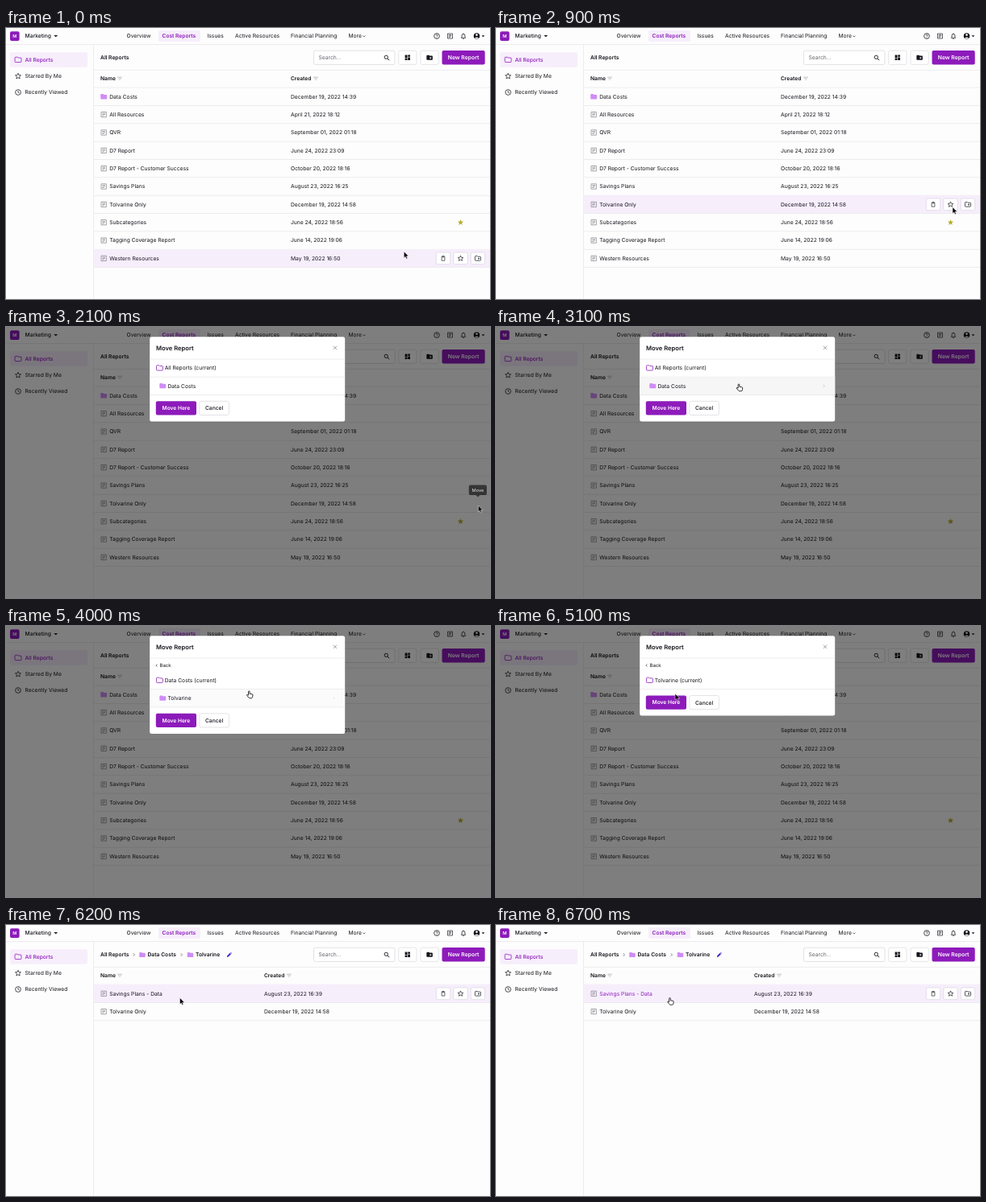
Write an HTML page that moves like this. It is 600x337 px and loops after 7.1 s.

```html
<!DOCTYPE html>
<html lang="en">
<head>
<meta charset="utf-8">
<title>Move a report into a folder</title>
<style>
html, body { margin: 0; width: 100%; height: 100%; overflow: hidden; background: #fdfdfd; }
svg { display: block; width: 100%; height: 100%; }
text { font-family: Inter, "Open Sans", sans-serif; text-rendering: geometricPrecision; white-space: pre; }
</style>
</head>
<body>
<svg id="stage" viewBox="0 0 600 337"></svg>
<script>
const LOOP = 7100, STEP = 100;
const PURPLE = '#8d1bbb', TINT = '#f7eefc', INK = '#15151c', LINE = '#e6e6e8', FOLDER = '#d08cf6';
const VENDOR = 'Tolvarine';
const stage = document.getElementById('stage');

const reports = [
  ['Data Costs', 'December 19, 2022 14:39'],
  ['All Resources', 'April 21, 2022 18:12'],
  ['QVR', 'September 01, 2022 01:18'],
  ['D7 Report', 'June 24, 2022 23:09'],
  ['D7 Report - Customer Success', 'October 20, 2022 18:16'],
  ['Savings Plans', 'August 23, 2022 16:25'],
  [VENDOR + ' Only', 'December 19, 2022 14:58'],
  ['Subcategories', 'June 24, 2022 18:56'],
  ['Tagging Coverage Report', 'June 14, 2022 19:06'],
  ['Western Resources', 'May 19, 2022 16:50']
];
const folderReports = [
  ['Savings Plans - Data', 'August 23, 2022 16:39'],
  [VENDOR + ' Only', 'December 19, 2022 14:58']
];
const STARRED = 7, ROW_TOP = 74.1, ROW_H = 22.35;

// Icons on a 24-unit grid
const FOLDER_PATH = 'M10 4H4c-1.1 0-2 .9-2 2v12c0 1.1.9 2 2 2h16c1.1 0 2-.9 2-2V8c0-1.1-.9-2-2-2h-8z';
const PLUS = 'M12 13h6M15 10v6';
const icons = {
  folder: FOLDER_PATH,
  star: 'M12 17.3L18.2 21l-1.7-7L22 9.2l-7.2-.6L12 2 9.2 8.6 2 9.2 7.5 14l-1.7 7z',
  clock: 'M21 12a9 9 0 1 1-18 0a9 9 0 1 1 18 0M12 6.5V12l4 2.5',
  search: 'M16 10a6 6 0 1 1-12 0a6 6 0 1 1 12 0M14.5 14.5L21 21',
  report: 'M3 3h18v18H3zM7 8h10M7 12h10M7 16h6',
  filter: 'M3 7h18M6 12h12M10 17h4',
  grid: 'M3 3h8v10H3zM13 3h8v6h-8zM13 11h8v10h-8zM3 15h8v6H3z',
  trash: 'M6 7h12v14H6zM4.500 4.500h15M9 3h6',
  folderPlus: FOLDER_PATH + PLUS,
  plus: PLUS,
  pen: 'M3 21v-4L14 6l4 4L7 21zM15.500 4.500L17 3l4 4-1.500 1.500z',
  help: 'M21 12a9 9 0 1 1-18 0a9 9 0 1 1 18 0M9 10a3 3 0 1 1 4.500 2.600q-1.500 1-1.500 2M12 16.500v2',
  bell: 'M5 18h14l-2-3v-5a5 5 0 0 0-10 0v5zM12 5V3M10 21h4',
  user: 'M22 12a10 10 0 1 1-20 0a10 10 0 1 1 20 0',
  right: 'M9 5l7 7-7 7',
  left: 'M15 5l-7 7 7 7',
  down: 'M5 9l7 7 7-7',
  caret: 'M3 8h18l-9 9z',
  close: 'M4 4l16 16M20 4L4 20'
};

function text(x, cy, str, { size = 6.72, weight = 400, fill = INK, anchor = 'start' } = {}) {
  return `<text x="${x}" y="${cy + size * .36}" font-size="${size}" font-weight="${weight}" fill="${fill}" text-anchor="${anchor}">${str}</text>`;
}
function box(x, y, w, h, fill, r = 0, stroke = 'none', sw = .7) {
  return `<rect x="${x}" y="${y}" width="${w}" height="${h}" rx="${r}" fill="${fill}" stroke="${stroke}" stroke-width="${sw}"/>`;
}
function icon(name, cx, cy, size, stroke = INK, fill = 'none', sw = 2) {
  const k = size / 24;
  return `<path d="${icons[name]}" transform="translate(${cx - size / 2} ${cy - size / 2}) scale(${k})" fill="${fill}" stroke="${stroke}" stroke-width="${sw}" stroke-linejoin="round"/>`;
}
const solid = (name, cx, cy, size, color) => icon(name, cx, cy, size, 'none', color);
const rule = (x, y, w) => box(x, y - .35, w, .7, LINE);

function topBar() {
  const links = [[149.5, 'Overview'], [249.5, 'Issues'], [284, 'Active Resources'],
    [353, 'Financial Planning'], [424.5, 'More']];
  return rule(0, 20.6, 600) + box(5, 4.3, 11.6, 11.6, PURPLE, 2) +
    text(10.8, 10.1, 'M', { size: 5.5, weight: 600, fill: '#fff', anchor: 'middle' }) +
    text(23.5, 10, 'Marketing', { weight: 500 }) + solid('caret', 61.7, 10, 6.5, INK) +
    box(189, 3, 52, 14, TINT, 2) +
    text(193.5, 10, 'Cost Reports', { weight: 600, fill: PURPLE, size: 6.65 }) +
    links.map(([x, label]) => text(x, 10, label)).join('') +
    icon('down', 444, 10.2, 5, INK, 'none', 3) +
    icon('help', 534, 10, 9) + icon('report', 550.5, 10, 8) + icon('bell', 567, 10, 9) +
    solid('user', 583.5, 10, 9, INK) + '<circle cx="583.5" cy="8.600" r="1.300" fill="#fff"/>' +
    '<path d="M581 12.600q2.500-2 5 0q-2.500 2-5 0" fill="#fff"/>' +
    solid('caret', 591.5, 10.2, 5, INK);
}

function sidebar() {
  return box(108.2, 20.6, .7, 317, LINE) + box(5, 30, 96, 18.8, TINT, 2) +
    icon('folder', 15, 39.4, 9.5, PURPLE) + text(23.5, 39.4, 'All Reports', { weight: 500, fill: PURPLE }) +
    icon('star', 15, 59.8, 8.5) + text(23.5, 59.8, 'Starred By Me') +
    icon('clock', 15, 80, 9) + text(23.5, 80, 'Recently Viewed');
}

function toolbar(inFolder) {
  const bold = { weight: 600 };
  let out = text(117, 37, 'All Reports', bold);
  if (inFolder) {
    out += icon('right', 158.5, 37, 6, '#444', 'none', 2.5) + solid('folder', 169, 37, 9, FOLDER) +
      text(175.5, 37, 'Data Costs', bold) + icon('right', 217.5, 37, 6, '#444', 'none', 2.5) +
      solid('folder', 228.5, 37, 9, FOLDER) + text(235, 37, VENDOR, bold) + solid('pen', 277, 36.8, 8, '#3b22cf');
  }
  return out + box(381.5, 28.2, 100.5, 17.2, '#fff', 2, '#d6d6da') +
    text(387.5, 37, 'Search...', { fill: '#66666e' }) + icon('search', 472, 37, 8.5, INK, 'none', 2.6) +
    box(486.7, 28.2, 22.2, 17.2, '#fff', 2, '#dcdce0') + solid('grid', 497.8, 36.8, 8.5, INK) +
    box(514, 28.2, 22.2, 17.2, '#fff', 2, '#dcdce0') + solid('folder', 525.1, 36.8, 9, INK) +
    icon('plus', 525.1, 36.8, 9, '#fff') +
    box(540.5, 28, 53.2, 17.6, PURPLE, 2) +
    text(567.1, 36.9, 'New Report', { size: 6.85, weight: 600, fill: '#fff', anchor: 'middle' });
}

function rowButtons(cy, starred, ring) {
  const frame = x => box(x - 8.7, cy - 7.4, 17.4, 14.8, '#fff', 2, '#d9d4de');
  return [542, 563.5, 585].map(frame).join('') +
    (ring ? box(576.300, cy - 7.4, 17.4, 14.8, '#fff', 2.500, '#cda2e6', 1.2 + ring) : '') +
    icon('trash', 542, cy, 7.5) + icon('star', 563.5, cy, 8, starred ? '#b8ad2c' : INK, starred ? '#b8ad2c' : 'none') +
    icon('folderPlus', 585, cy, 8.5);
}

function table(rows, inFolder, { hover, linkHover, ring }) {
  const dateX = inFolder ? 320 : 353;
  let out = rule(109, 52.3, 491) + text(117, 63, 'Name', { weight: 600 }) + icon('filter', 141, 62.8, 8, '#aaa') +
    text(dateX, 63, 'Created', { weight: 600, size: 6.6 }) + icon('filter', dateX + 31, 62.8, 8, '#aaa') + rule(109, ROW_TOP, 491);
  rows.forEach(([name, date], i) => {
    const top = ROW_TOP + i * ROW_H, cy = top + ROW_H / 2;
    const starred = !inFolder && i === STARRED;
    if (i === hover) out += box(109, top, 491, ROW_H, TINT);
    out += rule(109, top + ROW_H, 491);
    out += !inFolder && i === 0 ? solid('folder', 121.2, cy, 9.5, FOLDER) : icon('report', 121.2, cy, 8.5, '#77777d', 'none', 1.8);
    out += text(128.2, cy, name, { fill: i === hover && linkHover ? PURPLE : INK }) + text(dateX, cy, date);
    if (i === hover) out += rowButtons(cy, starred, ring);
    else if (starred) out += solid('star', 563.5, cy, 8.5, '#b8ad2c');
  });
  return out;
}

function tooltip(opacity) {
  return `<g opacity="${opacity}">` + box(573.8, 196.4, 22.2, 12.6, '#050505', 2) +
    '<path d="M582.500 209h5l-2.500 2.600z" fill="#050505"/>' +
    text(585, 202.7, 'Move', { size: 5.6, weight: 500, fill: '#fff', anchor: 'middle' }) + '</g>';
}

function dialog({ current, child, back, hover, busy }) {
  const cy = back ? 67.3 : 50.8;
  const childY = cy + 22.4;
  const end = cy + (child ? 33.6 : 11.3);
  const mid = end + 16.5;
  let out = box(178.2, 12.2, 242, end + 33 - 12.2, '#fff', 2.5) +
    text(186, 25.8, 'Move Report', { size: 7.6, weight: 600 }) + icon('close', 408, 25.8, 6.5, '#555') + rule(178.2, 40, 242);
  if (back) out += icon('left', 186.7, 49, 5, INK, 'none', 3) + text(190.5, 49, 'Back', { size: 6 });
  out += icon('folder', 190.5, cy, 9.5, PURPLE) + text(196.7, cy, current + ' (current)') + rule(178.2, cy + 11.3, 242);
  if (child) {
    out += `<g opacity="${hover}">` + box(178.2, cy + 11.6, 242, 22, '#f6f6f7') +
      icon('right', 406.5, childY, 5, '#999', 'none', 2.5) + '</g>' +
      solid('folder', 194.3, childY, 9.5, FOLDER) + text(200.5, childY, child) + rule(178.2, end, 242);
  }
  const mix = (a, b) => Math.round(a + (b - a) * busy);
  const color = `rgb(${mix(141, 139)},${mix(27, 84)},${mix(187, 165)})`;
  return out + box(185.8, mid - 8.6, 50.2, 17.2, color, 2) +
    text(210.9, mid, 'Move Here', { weight: 600, fill: '#fff', anchor: 'middle', size: 6.65 }) +
    box(239.8, mid - 8.6, 36.6, 17.2, '#fff', 2, '#d9d9dd') +
    text(258.1, mid, 'Cancel', { weight: 500, anchor: 'middle' });
}

// time, x, y of the pointer tip
const track = [
  [0, 493.3, 278], [500, 557, 223], [600, 557, 223], [1400, 585.4, 222], [2300, 585.4, 222],
  [2700, 301, 71], [3200, 301, 71], [3600, 301, 76], [3900, 301, 76], [4000, 301.3, 81],
  [4300, 302, 87], [4500, 302, 87], [5100, 222, 84.2], [5200, 215.5, 90.6], [LOOP, 215.5, 90.6]
];
const ramp = (t, a, b) => Math.min(1, Math.max(0, (t - a) / (b - a)));

function pointerAt(t) {
  const i = Math.max(1, track.findIndex(p => p[0] >= t));
  const [t0, x0, y0] = track[i - 1], [t1, x1, y1] = track[i];
  const k = ramp(t, t0, t1), e = k * k * (3 - 2 * k);
  return [x0 + (x1 - x0) * e, y0 + (y1 - y0) * e];
}

function pointer(x, y, hand) {
  const shape = hand
    ? 'M-.8 .8q0-.9 .8-.9t.8 .9v2.400l2.900 .5q1 .2 1 1.200l-.5 2.800q-.2 1-1.200 1h-2.200q-.7 0-1.200-.6l-2.300-2.800q-.3-.9 .7-.8l1.200 .6z'
    : 'M0 0v8l1.800-1.700 1.200 2.700 1.400-.6-1.200-2.600h2.600z';
  return `<path transform="translate(${x} ${y})" d="${shape}" fill="${hand ? '#fff' : '#000'}" stroke="${hand ? '#000' : '#fff'}" stroke-width="${hand ? .8 : .5}" stroke-linejoin="round"/>`;
}

function dialogState(t) {
  if (t < 3200) return { current: 'All Reports', child: 'Data Costs', hover: ramp(t, 2600, 3000) };
  if (t < 4600) return { current: 'Data Costs', child: VENDOR, back: true, hover: ramp(t, 3800, 4300) };
  return { current: VENDOR, back: true, busy: ramp(t, 5600, 6000) };
}

function isHand(t) {
  return [[1000, 2100], [2700, 4600], [5200, 5700], [6300, LOOP]].some(([a, b]) => t >= a && t < b);
}

function draw(t) {
  const [x, y] = pointerAt(t);
  const open = t >= 2100 && t < 6200, inFolder = t >= 6200;
  const hover = open ? -1 : Math.floor((y - ROW_TOP) / ROW_H);
  const ring = t >= 1100 && t < 2100 ? ramp(t, 1700, 1900) * .6 + .01 : 0;
  let out = box(0, 0, 600, 337, '#fdfdfd') + topBar() + sidebar() + toolbar(inFolder) +
    table(inFolder ? folderReports : reports, inFolder, { hover, linkHover: t >= 6300, ring });
  if (open) out += box(0, 0, 600, 337, 'rgba(0,0,0,.5)');
  if (t >= 1200 && t < 2200) out += tooltip(open ? .6 : ramp(t, 1100, 1400));
  if (open) out += dialog({ hover: 0, busy: 0, ...dialogState(t) });
  stage.innerHTML = out + pointer(x, y, isHand(t));
}

const start = performance.now();
let shown = -1;
function tick() {
  const t = Math.floor((performance.now() - start) % LOOP / STEP) * STEP;
  if (t !== shown) draw(shown = t);
  requestAnimationFrame(tick);
}
tick();
</script>
</body>
</html>
```
